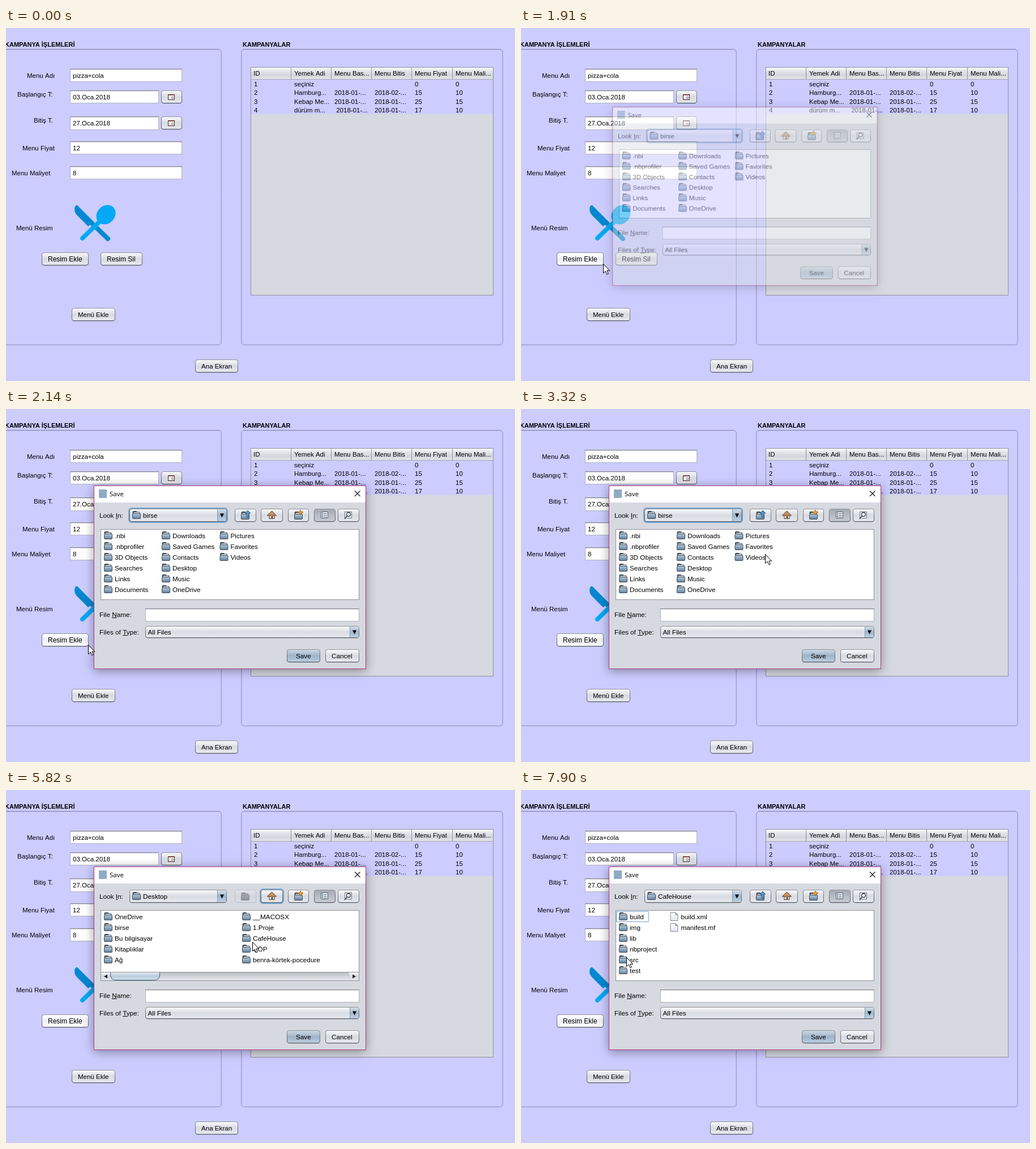
Animation, 899 px wide and 623 px high, one loop 7990 ms. Source, as an HTML page with a canvas:

```html
<!DOCTYPE html>
<html lang="tr">
<head>
<meta charset="utf-8">
<title>Kampanya</title>
<style>
html, body { margin: 0; width: 100%; height: 100%; overflow: hidden; background: #ccccff; }
canvas { display: block; }
</style>
</head>
<body>
<canvas id="stage" width="899" height="623"></canvas>
<script>
const W = 899, H = 623, LOOP = 7990;
const stage = document.getElementById('stage').getContext('2d');
const layer = document.createElement('canvas');
layer.width = W;
layer.height = H;
const dialogCtx = layer.getContext('2d');
let g = stage;

const SANS = '"Liberation Sans", Arial, sans-serif';
const FACES = {
  normal: ['#f8f9fa', '#d8dbe1', '#e6e9ee'],
  hover: ['#ffffff', '#eef0f4', '#fcfdfe'],
  pressed: ['#8f9ba8', '#a3afbc', '#bcc6d0'],
  selected: ['#a4a9b1', '#b7bcc4', '#c6cad1'],
  disabled: ['#dfe2e7', '#d3d6dc', '#d9dce1'],
  primary: ['#cbd8e4', '#9fb4c9', '#b9cde0'],
  arrow: ['#d3dfe9', '#a0b6cb', '#bdd1e2']
};

const lerp = (a, b, p) => a + (b - a) * p;
const smooth = p => p * p * (3 - 2 * p);

function vertical(y, h, colors) {
  const grad = g.createLinearGradient(0, y, 0, y + h);
  colors.forEach((c, i) => grad.addColorStop(i / (colors.length - 1), c));
  return grad;
}
function rect(x, y, w, h, fill) {
  g.fillStyle = fill;
  g.fillRect(x, y, w, h);
}
function round(x, y, w, h, r, fill) {
  g.fillStyle = fill;
  g.beginPath();
  g.roundRect(x, y, w, h, r);
  g.fill();
}
function outline(x, y, w, h, r, color, width = 1) {
  g.strokeStyle = color;
  g.lineWidth = width;
  g.beginPath();
  g.roundRect(x, y, w, h, r);
  g.stroke();
}
function poly(points, fill, stroke) {
  g.beginPath();
  points.forEach(([x, y]) => g.lineTo(x, y));
  g.closePath();
  if (fill) { g.fillStyle = fill; g.fill(); }
  if (stroke) { g.strokeStyle = stroke; g.lineWidth = 1; g.stroke(); }
}
function text(s, x, y, size = 11.5, color = '#000', weight = '', family = SANS) {
  g.font = `${weight} ${size}px ${family}`;
  g.fillStyle = color;
  g.fillText(s, x, Math.round(y));
}
function mnemonic(s, index, x, y) {
  text(s, x, y, 11.75);
  const start = g.measureText(s.slice(0, index)).width;
  rect(Math.round(x + start), y + 1, g.measureText(s[index]).width, 1, '#000');
}

function button(x, y, w, h, face = 'normal', focused = false) {
  if (focused) round(x - 2, y - 2, w + 4, h + 4, 6, '#73a4d1');
  else if (face !== 'disabled') round(x, y + 1, w, h, 5, 'rgba(110,115,140,.3)');
  const edge = face === 'disabled' ? ['#c5c8ce', '#b8bbc2'] : ['#92959b', '#53575d'];
  round(x, y, w, h, 4.5, vertical(y, h, edge));
  round(x + 1, y + 1, w - 2, h - 2, 3.5, vertical(y + 1, h - 2, FACES[face]));
}
function labelButton(s, x, y, w, h, tx, size, face, focused) {
  button(x, y, w, h, face, focused);
  text(s, tx, y + h / 2 + 4.5, size);
}
function field(x, y, w, h) {
  rect(x, y, w, h, '#b2b3bd');
  rect(x, y, w, 1, '#84868d');
  rect(x + 1, y + 1, w - 2, h - 2, '#fff');
  rect(x + 1, y + 1, w - 2, 1, '#d8d9dc');
}
function combo(x, y, w, h, focused) {
  button(x, y, w, h, 'normal', focused);
  const ax = x + w - 17;
  g.fillStyle = vertical(y + 1, h - 2, FACES.arrow);
  g.beginPath();
  g.roundRect(ax, y + 1, 16, h - 2, [0, 3, 3, 0]);
  g.fill();
  rect(ax, y + 1, 1, h - 2, '#8599ac');
  const cx = ax + 8.5, cy = y + h / 2;
  poly([[cx - 3.5, cy - 3], [cx + 3.5, cy - 3], [cx, cy + 4]], '#000');
}

function folder(x, y, gray) {
  const edge = gray ? '#888c92' : '#3d4b59';
  round(x + .5, y, 8, 5, 2, edge);
  round(x + 1.5, y + 1.5, 12, 10, 1.5, edge);
  round(x + 2.5, y + 2.5, 10, 8, 1, gray ? '#b4b8be' : '#eef3f7');
  round(x, y + 4, 15, 10, 2, edge);
  round(x + 1, y + 5, 13, 8, 1, vertical(y + 5, 8, gray ? ['#a4a8ae', '#8f949b'] : ['#b0c4d6', '#66849f']));
}
function page(x, y) {
  poly([[x + .5, y + .5], [x + 9.5, y + .5], [x + 13.5, y + 4.5], [x + 13.5, y + 14.5], [x + .5, y + 14.5]],
    vertical(y, 15, ['#fff', '#e2e8ee']), '#7d8790');
  poly([[x + 9.5, y + .5], [x + 9.5, y + 4.5], [x + 13.5, y + 4.5]], '#cfd6dd', '#7d8790');
}
function calendarButton(y) {
  button(274, y, 37, 23);
  rect(286, y + 7, 12, 10, '#4c2a2a');
  rect(287, y + 8, 10, 8, '#f4f1ee');
  rect(287, y + 8, 10, 1, '#b87070');
  outline(292.5, y + 11.5, 3, 3, 0, '#8a8a9a');
}

function cutlery() {
  g.lineCap = 'round';
  g.lineWidth = 8;
  const bar = (x0, y0, x1, y1, color) => {
    g.strokeStyle = color;
    g.beginPath();
    g.moveTo(x0, y0);
    g.lineTo(x1, y1);
    g.stroke();
  };
  bar(150, 343, 180, 372, '#0288d1');
  g.fillStyle = '#0288d1';
  g.beginPath();
  g.moveTo(126, 313);
  g.lineTo(155, 342);
  g.lineTo(145, 350);
  g.lineTo(125, 330);
  g.quadraticCurveTo(119, 323, 122, 315);
  g.quadraticCurveTo(124, 312, 126, 313);
  g.fill();
  bar(166, 341, 135, 371, '#03a9f4');
  g.fillStyle = '#03a9f4';
  g.beginPath();
  g.ellipse(176.5, 329.5, 18.5, 15.5, -Math.PI / 4, 0, 7);
  g.fill();
  g.lineCap = 'butt';
}

function panel(x, w) {
  outline(x + 1.5, 38.5, w - 3, 520, 4, '#b8b8e8');
  outline(x + .5, 37.5, w - 1, 522, 5, '#a0a0c9');
  rect(x + 4, 37, w - 8, 1, '#8a8aae');
}

function table() {
  rect(432, 69, 429, 403, '#8f929b');
  rect(433, 70, 427, 401, '#d6d9df');
  rect(433, 70, 427, 21, vertical(70, 21, ['#fafbfc', '#dfe2e7', '#d3d6dc', '#e8eaee']));
  rect(433, 90, 427, 1, '#a3a6ad');
  rect(433, 91, 427, 61, '#ccccff');
  const columns = [437, 509, 580, 651, 722, 794];
  const rows = [
    ['ID', 'Yemek Adi', 'Menu Bas...', 'Menu Bitis', 'Menu Fiyat', 'Menu Mali...'],
    ['1', 'seçiniz', '', '', '0', '0'],
    ['2', 'Hamburg...', '2018-01-...', '2018-02-...', '15', '10'],
    ['3', 'Kebap Me...', '2018-01-...', '2018-01-...', '25', '15'],
    ['4', 'dürüm m...', ' 2018-01-...', '2018-01-...', '17', '10']
  ];
  rows.forEach((row, r) => row.forEach((s, c) =>
    text(s, columns[c] + (r && !c ? 1 : 0), r ? 88 + r * 15.2 : 84)));
  columns.slice(1).forEach(x => rect(x - 6, 70, 1, 21, '#8f929b'));
}

function mainWindow(t) {
  rect(0, 0, W, H, '#ccccff');
  panel(-12, 393);
  panel(415, 463);
  text('KAMPANYA İŞLEMLERİ', -2, 33, 11, '#000', 'bold');
  text('KAMPANYALAR', 418, 33, 11, '#000', 'bold');

  [['Menu Adı', 37, 88], ['Başlangıç T:', 20, 121], ['Bitiş T.', 49, 167], ['Menu Fiyat', 29, 216],
   ['Menu Maliyet', 10, 260], ['Menü Resim', 18, 357]].forEach(a => text(...a));
  [['pizza+cola', 72, 198, 23], ['03.Oca.2018', 110, 157, 23], ['27.Oca.2018', 156, 157, 24],
   ['12', 200, 198, 23], ['8', 244, 198, 23]].forEach(([s, y, w, h]) => {
    field(113, y, w, h);
    text(s, 118, y + 16.3);
  });
  calendarButton(110);
  calendarButton(156);
  cutlery();

  const pressed = t >= 1540 && t < 1910;
  const face = pressed ? 'pressed' : t >= 989 ? 'hover' : 'normal';
  labelButton('Resim Ekle', 63, 396, 83, 23, 74, 12, face, pressed);
  labelButton('Resim Sil', 167, 396, 74, 23, 178, 12);
  labelButton('Menü Ekle', 116, 494, 77, 23, 127, 11.5);
  labelButton('Ana Ekran', 334, 585, 76, 23, 345, 11.6);
  table();
}

function house(x, y) {
  rect(x - 5, y, 10, 7, '#4b4036');
  rect(x - 4, y, 8, 6, '#efe6d8');
  rect(x - 1, y + 2, 3, 5, '#70543c');
  poly([[x - 8, y + 1], [x, y - 7], [x + 8, y + 1]], '#cf9259', '#4a3526');
}
function toolbar(t) {
  const atDesktop = t >= 4170 && t < 6580;
  button(404, 176, 38, 23, atDesktop ? 'disabled' : 'normal');
  folder(415, 181, atDesktop);
  if (!atDesktop) {
    poly([[427, 179], [432, 184], [429, 184], [429, 191], [425, 191], [425, 184], [422, 184]], '#5b97cc', '#2b557c');
  }

  const over = t >= 3481 && t < 4640;
  const down = t >= 3850 && t < 3935;
  button(450, 176, 39, 23, down ? 'pressed' : over ? 'hover' : 'normal', t >= 3850 && t < 6290);
  house(469.5, 187);

  button(498, 176, 37, 23);
  folder(509, 181);
  poly([[520, 178], [521.5, 181], [525, 182], [521.5, 183.5], [520, 187], [518, 183.5], [515, 182], [518.5, 181]],
    '#f0a33c', '#a8651b');

  button(544, 176, 38, 23, 'selected');
  outline(556.5, 181.5, 12, 11, 0, '#59636e');
  rect(557, 182, 11, 10, '#eef2f6');
  for (let i = 0; i < 3; i++) {
    rect(558, 183 + i * 3, 2, 2, '#4d7397');
    rect(561, 184 + i * 3, 6, 1, '#59636e');
  }

  button(586, 176, 38, 23);
  rect(598, 181, 13, 12, '#6c7680');
  rect(599, 182, 11, 10, '#f3f5f7');
  g.strokeStyle = '#36424e';
  g.lineWidth = 1.5;
  g.beginPath();
  g.arc(605, 186, 3.5, 0, 7);
  g.moveTo(602.5, 188.5);
  g.lineTo(598, 194);
  g.stroke();
}

function column(names, x, icon = folder) {
  names.forEach((s, i) => {
    icon(x, 216 + i * 19);
    text(s, x + 19, 228 + i * 19, 11.75);
  });
}
function fileList(t) {
  rect(167, 212, 457, 125, '#8f929b');
  rect(168, 213, 455, 123, '#fff');
  if (t < 4170) {
    column(['.nbi', '.nbprofiler', '3D Objects', 'Searches', 'Links', 'Documents'], 173);
    column(['Downloads', 'Saved Games', 'Contacts', 'Desktop', 'Music', 'OneDrive'], 275);
    column(['Pictures', 'Favorites', 'Videos'], 377.5);
  } else if (t < 6580) {
    column(['OneDrive', 'birse', 'Bu bilgisayar', 'Kitaplıklar', 'Ağ'], 173);
    if (t >= 6290) rect(412, 252, 92, 19, '#39698a');
    column(['__MACOSX', '1.Proje', 'CafeHouse', 'ÇÖP', 'benra-körtek-pocedure'], 417);
    if (t >= 6290) text('CafeHouse', 436, 266, 11.75, '#fff');
    scrollbar();
  } else {
    outline(168.5, 214.5, 57, 18, 0, '#73a4d1');
    column(['build', 'img', 'lib', 'nbproject', 'src', 'test'], 173);
    column(['build.xml', 'manifest.mf'], 263.5, page);
  }
}
function scrollbar() {
  rect(168, 322, 455, 14, vertical(322, 14, ['#b9bdc4', '#d2d5da', '#e4e6ea']));
  rect(168, 321, 455, 1, '#8f929b');
  const end = vertical(322, 14, ['#f4f5f7', '#d6d9df', '#e2e5ea']);
  round(168, 322, 17, 14, [0, 0, 8, 0], end);
  round(606, 322, 17, 14, [0, 0, 0, 8], end);
  poly([[173, 329], [179, 325.5], [179, 332.5]], '#222');
  poly([[618, 329], [612, 325.5], [612, 332.5]], '#222');
  g.save();
  g.beginPath();
  g.rect(180, 322, 100, 14);
  g.clip();
  round(184, 314, 88, 22, 9, '#3f5c77');
  round(185, 315, 86, 20, 8, vertical(322, 13, ['#e3ebf2', '#b9ccdc', '#cfe2ee']));
  g.restore();
}

function dialog(t) {
  g.clearRect(0, 0, W, H);
  rect(155, 135, 481, 324, '#ac3b83');
  rect(156, 136, 479, 322, '#d6d9df');
  rect(156, 136, 479, 29, '#fff');
  rect(164, 142, 14, 15, '#8fabc4');
  text('Save', 183, 154, 11.5, '#000', '', '"Open Sans", "Noto Sans", sans-serif');
  g.strokeStyle = '#111';
  g.lineWidth = 1.1;
  g.beginPath();
  g.moveTo(616, 144.5);
  g.lineTo(625.5, 154);
  g.moveTo(625.5, 144.5);
  g.lineTo(616, 154);
  g.stroke();

  mnemonic('Look In:', 5, 165, 192);
  combo(218, 176, 172, 23, t < 3850);
  folder(223, 180);
  text(t < 4170 ? 'birse' : t < 6580 ? 'Desktop' : 'CafeHouse', 242, 192, 11.75);
  toolbar(t);
  fileList(t);

  mnemonic('File Name:', 5, 165, 367);
  field(246, 352, 378, 23);
  mnemonic('Files of Type:', 9, 165, 398);
  combo(246, 383, 378, 21);
  text('All Files', 250.5, 398, 11.75);
  labelButton('Save', 496, 424, 59, 23, 512, 11.75, 'primary');
  labelButton('Cancel', 564, 424, 60, 23, 575, 11.75);
}

// The shadow is kept outside the window so that it does not tint the fade.
function dropShadow() {
  g.save();
  g.beginPath();
  g.rect(100, 80, 591, 440);
  g.rect(155, 135, 481, 324);
  g.clip('evenodd');
  g.shadowColor = 'rgba(0,0,0,.38)';
  g.shadowBlur = 17;
  g.shadowOffsetY = 3;
  rect(155, 135, 481, 324, '#000');
  g.restore();
}
function showDialog(t) {
  g = dialogCtx;
  dialog(t);
  g = stage;
  const k = Math.min(1, Math.floor((t - 1910) / 76.6 + .01) / 3);
  const p = 1 - (1 - k) ** 2;
  const scale = lerp(.974, 1, p);
  g.save();
  g.globalAlpha = lerp(.45, 1, p);
  g.translate(395.5, 297);
  g.scale(scale, scale);
  g.translate(-395.5, -297);
  dropShadow();
  g.drawImage(layer, 0, 0);
  g.restore();
}

// start, end, steps, target x, target y, bulge
const MOVES = [
  [300, 990, 10, 145, 416, 0],
  [2310, 2690, 6, 376, 356, 0],
  [2930, 3560, 9, 471, 184, 0],
  [4570, 4960, 6, 336, 266, 0],
  [5190, 5814, 9, 435, 268, 7],
  [5892, 5970, 2, 445, 262, 0],
  [6060, 6061, 1, 446, 262, 0],
  [7060, 7430, 6, 177, 286, 0],
  [7610, 7900, 5, 186, 295, 0]
];
function pointer(t) {
  let x = 689, y = 595;
  for (const [start, end, steps, tx, ty, bulge] of MOVES) {
    if (t < start) break;
    const gap = (end - start) / Math.max(1, steps - 1);
    const step = Math.min(steps, Math.floor((t - start) / gap + .02) + 1);
    const p = smooth(step / steps);
    x = lerp(x, tx, p);
    y = lerp(y, ty, p) + bulge * Math.sin(Math.PI * p);
  }
  return [Math.round(x), Math.round(y)];
}
function drawPointer(t) {
  if (t < 300) return;
  const [x, y] = pointer(t);
  const inField = t > 2140 && x > 246 && x < 624 && y >= 352 && y < 375;
  if (inField) {
    rect(x, y - 7, 1, 14, '#000');
    for (const dy of [-8, 7]) {
      rect(x - 3, y + dy, 3, 1, '#000');
      rect(x + 1, y + dy, 3, 1, '#000');
    }
    return;
  }
  const shape = [[0, 0], [0, 16], [3.7, 12.6], [6.3, 18.3], [8.8, 17.2], [6.3, 11.7], [11.3, 11.7]];
  poly(shape.map(([dx, dy]) => [x + .5 + dx, y + .5 + dy]), '#fff', '#000');
}

function draw(now) {
  const t = now % LOOP;
  mainWindow(t);
  if (t >= 1910) showDialog(t);
  drawPointer(t);
}

const begin = performance.now();
function tick() {
  draw(performance.now() - begin);
  requestAnimationFrame(tick);
}
tick();
</script>
</body>
</html>
```
